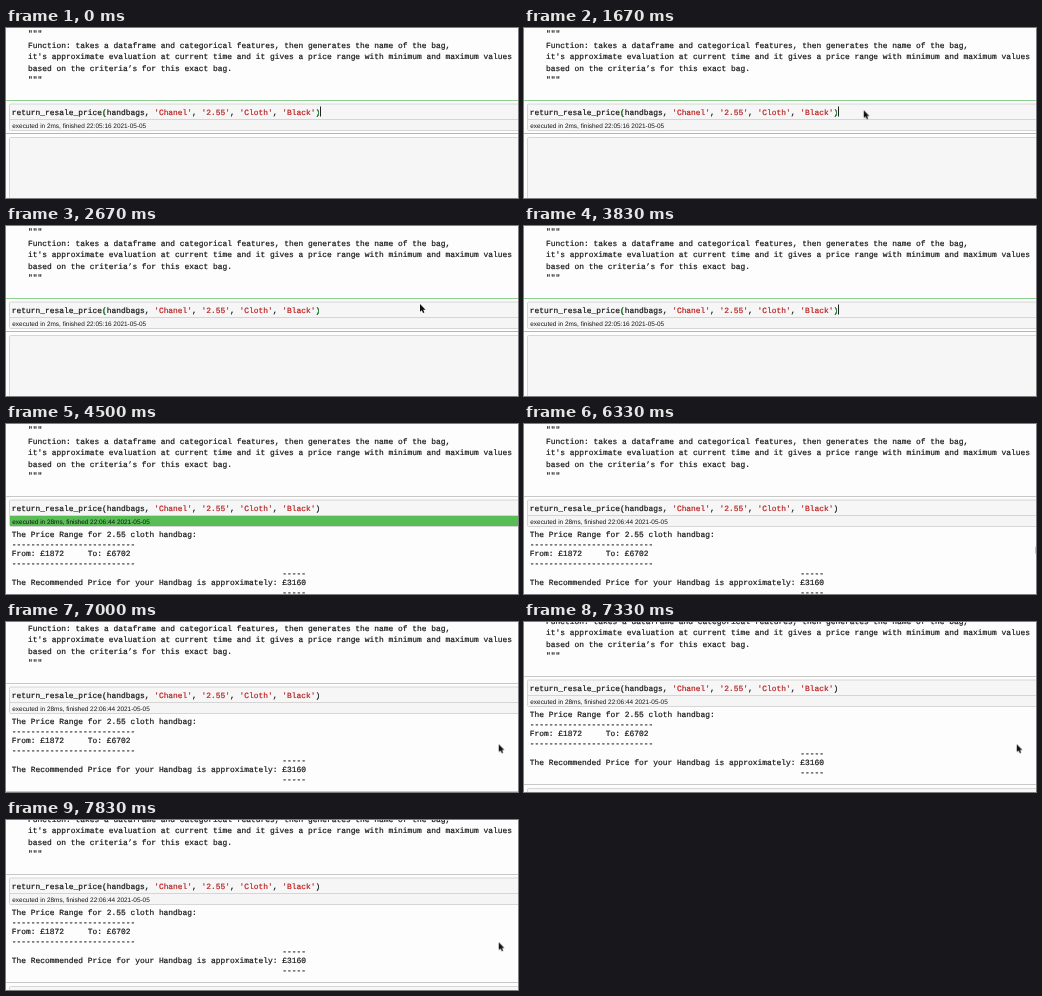
An HTML page for the animation above (8 s loop, 512 px wide and 170 px high).

```html
<!DOCTYPE html>
<html lang="en">
<head>
<meta charset="utf-8">
<title>Resale price notebook</title>
<style>
  html, body { margin: 0; width: 100%; height: 100%; overflow: hidden; background: #fefdfe; }
  svg { display: block; width: 512px; height: 170px; }
  text { white-space: pre; text-rendering: geometricPrecision; }
  .mono { font: 7.91px "Liberation Mono", "Courier New", monospace; fill: #161616; stroke: #161616; stroke-width: .2px; }
  .info { font: 6.43px "Liberation Sans", Arial, sans-serif; fill: #151515; }
  .str { fill: #ba2121; stroke: #ba2121; }
  .box { fill: #f7f6f7; stroke: #d6d6d6; }
  .rule { stroke: #c8c8c8; }
  .edit { stroke: #8fcf92; }
  .bracket { fill: #2a9a3a; stroke: #2a9a3a; }

  .page, .before, .after, .bar, .caret, .mouse {
    animation: 8s step-end -4ms infinite;
  }
  .page { animation-name: scroll; }
  .before { animation-name: before; }
  .after { animation-name: after; }
  .bar { animation-name: flash; }
  .caret { animation-name: blink; }
  .mouse { animation-name: move; }

  @keyframes scroll {
    0% { transform: none; }
    87.5% { transform: translateY(-11px); }
    89.6% { transform: translateY(-15px); }
    91.6% { transform: translateY(-18px); }
  }
  @keyframes before { 0% { opacity: 1; } 54.1%, 100% { opacity: 0; } }
  @keyframes after { 0% { opacity: 0; } 54.1%, 100% { opacity: 1; } }
  @keyframes flash {
    0% { fill: #f5f5f5; }
    54.1% { fill: #1cbf1a; }
    56.25% { fill: #58bd55; }
    58.35% { fill: #dcefdb; }
    60.35%, 100% { fill: #f5f5f5; }
  }
  @keyframes blink {
    0%, 8.35%, 20.85%, 35.35%, 47.85% { opacity: 1; }
    2.1%, 14.6%, 29.1%, 41.6%, 54.1%, 100% { opacity: 0; }
  }
  @keyframes move {
    0% { transform: translate(-20px, 0); }
    2.1% { transform: translate(218px, 132px); }
    4.1% { transform: translate(238px, 126px); }
    6.25% { transform: translate(270px, 116px); }
    8.35% { transform: translate(306px, 104px); }
    10.35% { transform: translate(336px, 95px); }
    12.5% { transform: translate(356px, 89px); }
    14.6% { transform: translate(346px, 86px); }
    16.6% { transform: translate(344px, 72px); }
    18.75% { transform: translate(341px, 77px); }
    20.85% { transform: translate(339.7px, 82.2px); }
    29.1% { transform: translate(352px, 83px); }
    31.25% { transform: translate(384px, 81px); }
    33.35% { transform: translate(414px, 78px); }
    35.35% { transform: translate(-20px, 0); }
    79.1% { transform: translate(511.7px, 122.2px); }
    81.25% { transform: translate(499px, 122.2px); }
    83.35%, 100% { transform: translate(492.7px, 122.2px); }
  }
</style>
</head>
<body>
<svg viewBox="0 0 512 170">
  <g class="page">
    <g class="mono">
      <text x="22" y="8">"""</text>
      <text x="22" y="19.5">Function: takes a dataframe and categorical features, then generates the name of the bag,</text>
      <text x="22" y="31">it's approximate evaluation at current time and it gives a price range with minimum and maximum values</text>
      <text x="22" y="42.5">based on the criteria’s for this exact bag.</text>
      <text x="22" y="54">"""</text>
    </g>

    <path class="rule" d="M0 72.5H512"/>
    <rect class="box" x="3.5" y="76" width="520" height="26.5" rx="1"/>
    <rect class="bar" x="4" y="92" width="508" height="10"/>
    <path class="rule" d="M4 91.5H512" stroke-opacity=".7"/>

    <text class="mono" x="5.8" y="86.5">return_resale_price(handbags, <tspan class="str">'Chanel'</tspan>, <tspan class="str">'2.55'</tspan>, <tspan class="str">'Cloth'</tspan>, <tspan class="str">'Black'</tspan>)</text>

    <g class="before">
      <path class="edit" d="M0 72.5H512M0 105.5H512"/>
      <text class="mono bracket" x="5.8" y="86.5"><tspan fill="none" stroke="none">return_resale_price</tspan>(</text>
      <text class="mono bracket" x="309.5" y="86.5">)</text>
      <text class="info" x="6.3" y="99.9">executed in 2ms, finished 22:05:16 2021-05-05</text>
      <rect class="box" x="3.5" y="109.5" width="520" height="80" rx="1"/>
    </g>
    <path class="caret" d="M314.5 78.5V88.5" stroke="#222"/>

    <g class="after">
      <text class="info" x="6.3" y="99.9">executed in 28ms, finished 22:06:44 2021-05-05</text>
      <g class="mono">
        <text x="5.8" y="113">The Price Range for 2.55 cloth handbag:</text>
        <text x="5.8" y="122.7">--------------------------</text>
        <text x="5.8" y="132.3">From: £1872     To: £6702</text>
        <text x="5.8" y="142">--------------------------</text>
        <text x="276.2" y="151.7">-----</text>
        <text x="5.8" y="161.3">The Recommended Price for your Handbag is approximately: £3160</text>
        <text x="276.2" y="171">-----</text>
      </g>
      <path class="rule" d="M0 180.5H512"/>
      <rect class="box" x="3.5" y="184.5" width="520" height="80" rx="1"/>
    </g>
  </g>

  <path class="mouse" d="M0 0V7.8L1.8 6.2 3 9 4.4 8.4 3.2 5.7H5.6Z" fill="#111" stroke="#fff" stroke-width=".6" paint-order="stroke"/>
</svg>
</body>
</html>
```
